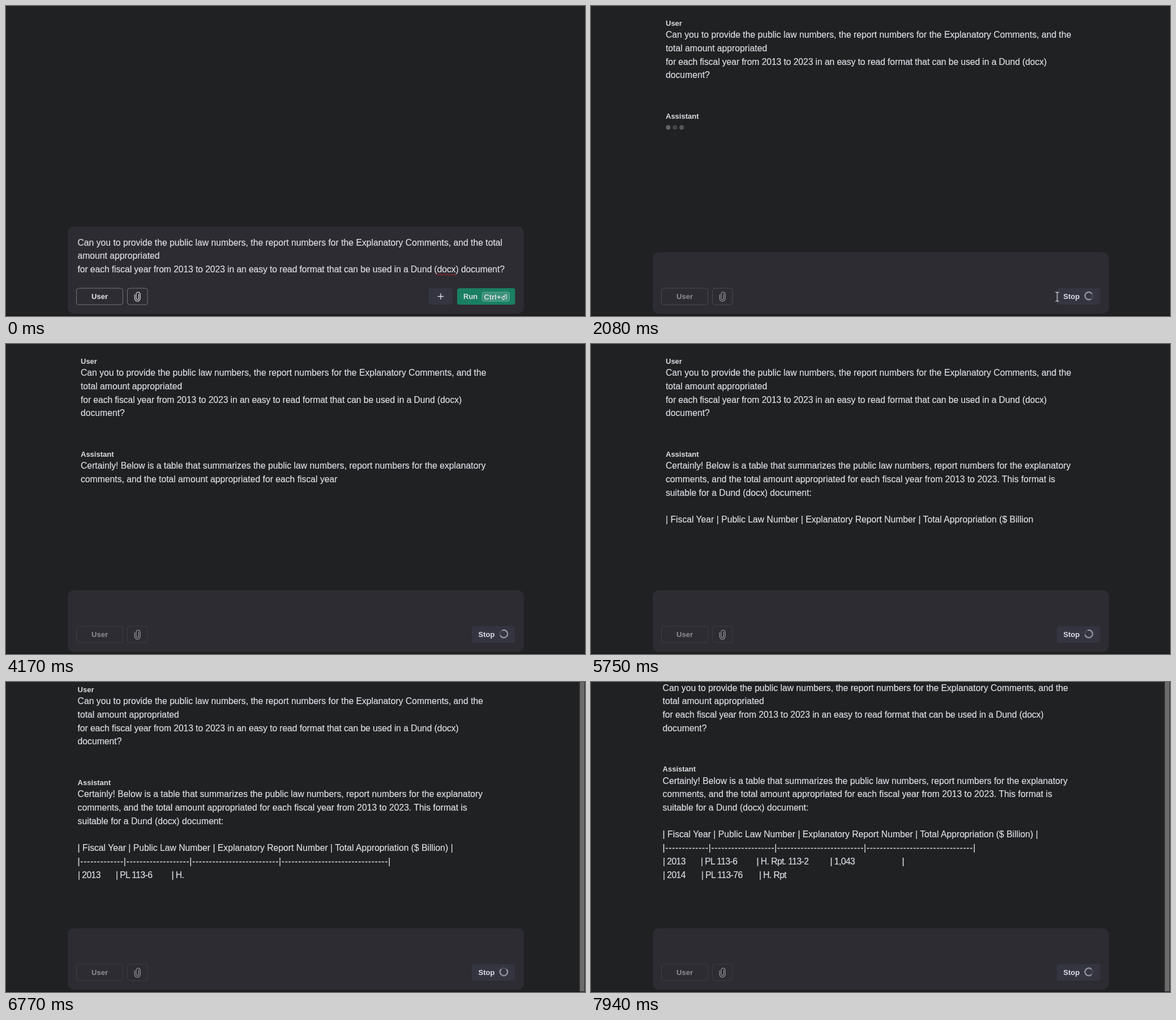
An HTML page for the animation above (8000 ms loop, 1023 px wide and 547 px high).

```html
<!DOCTYPE html>
<html lang="en">
<head>
<meta charset="utf-8">
<title>Chat playground</title>
<style>
html, body { margin: 0; width: 100%; height: 100%; overflow: hidden; background: #202123; }
svg { display: block; width: 1023px; height: 547px; }
text {
  font: 15.73px "Liberation Sans", Arial, sans-serif;
  fill: #dcdce3; stroke: #dcdce3; stroke-width: .2px; white-space: pre;
}
.bold { font-size: 13px; font-weight: 700; stroke: none; }
.tight { letter-spacing: -.006em; }
.rule { letter-spacing: .65px; }
.row { letter-spacing: -.6px; }
.icon { fill: none; stroke-linecap: round; stroke-linejoin: round; }

.before, .after, #feed, .dots, .bar, .cursor, .beam, .hand, .run { animation: 8s step-end infinite; }
.before { animation-name: before; }
.after { animation-name: after; }
.dots { animation-name: dots; }
.bar { animation-name: bar; }
#feed { animation-name: scroll; }
.run { fill: #1a7f64; animation-name: hover; }
.cursor { animation: move 8s linear infinite; }
.beam { animation-name: beam; }
.hand { animation-name: hand; }
.line { fill: none; animation: line 8s linear infinite; }
.label { animation: label 8s linear infinite; }
.clip { animation: clip 8s linear infinite; }
.spin { animation: spin 8s linear infinite; }
.dots circle { fill: #8a8a8f; animation: pulse 1.2s -.66s ease-in-out infinite; }
.dots circle:nth-child(2) { animation-delay: -.26s; }
.dots circle:nth-child(3) { animation-delay: .14s; }

@keyframes before { 0% { visibility: visible } 23.25%, 100% { visibility: hidden } }
@keyframes after { 0% { visibility: hidden } 23.25%, 100% { visibility: visible } }
@keyframes dots { 0% { visibility: hidden } 23.25% { visibility: visible } 33.875%, 100% { visibility: hidden } }
@keyframes bar { 0% { visibility: hidden } 80.625%, 100% { visibility: visible } }
@keyframes scroll {
  0% { transform: none }
  80.625% { transform: translate(-5.4px, -16.9px) }
  92.5%, 100% { transform: translate(-5.4px, -40.6px) }
}
@keyframes hover { 0% { fill: #1a7f64 } 4.4%, 100% { fill: #1a7059 } }
@keyframes move {
  0%, 2.5% { transform: translate(903px, 534px) }
  4.4% { transform: translate(885px, 522px) }
  8.625%, 23.25% { transform: translate(852px, 514px) }
  26% { transform: translate(824px, 513px) }
  37.375% { transform: translate(530px, 523px) }
  43.6% { transform: translate(482px, 525px) }
  45% { transform: translate(470px, 537px) }
  46.5%, 100% { transform: translate(462px, 562px) }
}
@keyframes beam {
  0% { visibility: hidden } 2.5% { visibility: visible }
  4.4% { visibility: hidden } 25.5% { visibility: visible } 46.5%, 100% { visibility: hidden }
}
@keyframes hand { 0% { visibility: hidden } 4.4% { visibility: visible } 25.5%, 100% { visibility: hidden } }
@keyframes line { 0%, 23.25% { stroke: #74747f } 26% { stroke: #4a4a54 } 28%, 100% { stroke: #3d3d46 } }
@keyframes label { 0%, 23.25% { fill: #e4e4ea } 25.5%, 100% { fill: #8e8e98 } }
@keyframes clip { 0%, 23.25% { stroke: #d5d5dc } 25.5%, 100% { stroke: #92929b } }
@keyframes pulse { 0%, 100% { opacity: .35 } 45% { opacity: .75 } 75% { opacity: .35 } }
@keyframes spin {
  0%, 23.25% { transform: rotate(12deg) }
  26% { transform: rotate(100deg) }
  37.375% { transform: rotate(460deg) }
  52.125% { transform: rotate(1010deg) }
  71.875% { transform: rotate(1740deg) }
  84.625% { transform: rotate(2160deg) }
  99.25% { transform: rotate(2610deg) }
  100% { transform: rotate(2634deg) }
}
</style>
</head>
<body>
<svg viewBox="0 0 1023 547">
  <rect width="1023" height="547" fill="#202123"/>

  <g id="feed">
    <g class="after">
      <text class="bold" x="132" y="34.5">User</text>
      <text x="132" y="56.3">Can you to provide the public law numbers, the report numbers for the Explanatory Comments, and the</text>
      <text x="132" y="80">total amount appropriated</text>
      <text class="tight" x="132" y="103.7">for each fiscal year from 2013 to 2023 in an easy to read format that can be used in a Dund (docx)</text>
      <text x="132" y="127.4">document?</text>
      <text class="bold" x="132" y="198.5">Assistant</text>
    </g>
    <g class="dots">
      <circle cx="136.5" cy="214.3" r="4"/>
      <circle cx="148.3" cy="214.3" r="4"/>
      <circle cx="160.1" cy="214.3" r="4"/>
    </g>
  </g>

  <g class="bar">
    <rect x="1012" width="11" height="547" fill="#2b2b2c"/>
    <rect x="1014" y="-4" width="8" height="556" rx="4" fill="#6b6b6b"/>
  </g>

  <g class="before">
    <rect x="109" y="389" width="806" height="154" rx="11" fill="#2d2c32"/>
    <text x="126.5" y="422.6">Can you to provide the public law numbers, the report numbers for the Explanatory Comments, and the total</text>
    <text x="126.5" y="446.3">amount appropriated</text>
    <text class="tight" x="126.5" y="470">for each fiscal year from 2013 to 2023 in an easy to read format that can be used in a Dund (docx) document?</text>
    <path class="icon" d="M760 474q1.5-3 3 0t3 0 3 0 3 0 3 0 3 0 3 0 3 0 3 0 3 0 3 0 3 0" stroke="#c8202c"/>
    <rect x="747" y="498" width="42" height="29" rx="4" fill="#343541"/>
    <path class="icon" d="M763.3 512.5h9.4M768 507.8v9.4" stroke="#dcdce3" stroke-width="1.4"/>
    <rect class="run" x="797" y="498" width="102.5" height="29" rx="4"/>
    <text class="bold" x="808" y="517">Run</text>
    <rect x="841.5" y="505" width="48" height="16" rx="3" fill="#fff" fill-opacity=".14" stroke="#fff" stroke-opacity=".3"/>
    <text class="bold" x="844.5" y="518">Ctrl+</text>
    <path class="icon" d="M881.5 509.5h3v7h-5v2l-4-3.5 4-3.5v2h2z" stroke="#dcdce3" stroke-width="1.2"/>
  </g>

  <g class="after">
    <rect x="109" y="434.5" width="806" height="108.5" rx="11" fill="#2d2c32"/>
    <rect x="823" y="498" width="76.5" height="29" rx="4" fill="#343541"/>
    <text class="bold" x="834.5" y="517">Stop</text>
    <g transform="translate(879.5 511.5)">
      <g class="spin icon" stroke-width="1.9">
        <circle r="6.7" stroke="#4b4c57"/>
        <path d="M5.1 -4.3A6.7 6.7 0 1 1 -5.1 -4.3" stroke="#a9a9b2"/>
      </g>
    </g>
  </g>

  <rect class="line" x="124.5" y="498" width="82" height="29" rx="4"/>
  <text class="bold label" x="165.5" y="517" text-anchor="middle">User</text>
  <rect class="line" x="214.5" y="498" width="35.5" height="29" rx="4"/>
  <path class="icon clip" d="M234.5 508.5v7a2.3 2.3 0 0 1-4.6 0v-6.800a1.300 1.300 0 0 1 0-.2a3.600 3.600 0 0 1 7.200 0v7.500a4.900 4.900 0 0 1-9.800 0v-6.500" stroke-width="1.300"/>
  <rect y="546" width="1023" height="1" fill="#141517"/>

  <g class="cursor">
    <path class="beam icon" d="M-3-8h2l1 1 1-1h2M0-7V7M-3 8h2l1-1 1 1h2" stroke="#e6e6e6" stroke-width="1.2"/>
    <path class="hand" d="M-1.500 1a1.500 1.500 0 0 1 3 0v5l6 1.500q2 .5 2 2.500l-1 7h-8l-5-7q1-2 4 0z" fill="#fff" stroke="#111" stroke-width=".8"/>
  </g>
</svg>
<script>
const LOOP = 8000, FIRST = 220.3, STEP = 23.7;
const feed = document.getElementById('feed');
const dashes = [13, 19, 26, 32].map(n => '|' + '-'.repeat(n)).join('') + '|';

// x, row, class, then pieces of [text, first token time, last token time]
const lines = [
  [132, 0, '',
    ['Certainly! Below is a table that summarizes the public law numbers, report numbers for', 2710, 2975],
    [' the explanatory', 3100, 3250]],
  [132, 1, '',
    ['comments, and the', 3310, 3480],
    [' total amount appropriated for each fiscal year', 3550, 4150],
    [' from 2013 to 2023. This format is', 4240, 4720]],
  [132, 2, '', ['suitable for a Dund (docx) document:', 4800, 5120]],
  [132, 4, '',
    ['| Fiscal Year | Public Law Number | Explanatory Report Number | Total Appropriation ($ Billion', 5200, 5740],
    [') |', 5850, 5950]],
  [132, 5, 'rule', [dashes, 6020, 6380]],
  [132.4, 6, 'row', ['| 2013', 6450, 6480]],
  [199.3, 6, 'row', ['| PL 113-6', 6520, 6640]],
  [298, 6, 'row', ['| H.', 6700, 6755], [' Rpt. 113-2', 6850, 6980]],
  [428, 6, 'row', ['| 1,043', 7060, 7150]],
  [555, 6, 'row', ['|', 7280, 7280]],
  [132.4, 7, 'row', ['| 2014', 7400, 7440]],
  [200.3, 7, 'row', ['| PL 113', 7500, 7590], ['-76', 7680, 7680]],
  [302.3, 7, 'row', ['| H. Rpt', 7800, 7920]],
].map(([x, row, cls, ...pieces]) => {
  const el = document.createElementNS('http://www.w3.org/2000/svg', 'text');
  el.setAttribute('x', x);
  el.setAttribute('y', FIRST + row * STEP);
  el.setAttribute('class', cls);
  feed.append(el);
  const tokens = pieces.flatMap(([text, from, to]) => {
    const parts = text.match(/\s*\||\s*[^\s|]+/g);
    const gap = (to - from) / Math.max(1, parts.length - 1);
    return parts.map((s, i) => ({ s, at: from + gap * i }));
  });
  return { el, tokens };
});

let start;
function draw(now) {
  start ??= now;
  const t = (now - start) % LOOP;
  for (const { el, tokens } of lines) {
    const shown = tokens.filter(k => k.at <= t).map(k => k.s).join('');
    if (el.textContent !== shown) el.textContent = shown;
  }
  requestAnimationFrame(draw);
}
requestAnimationFrame(draw);
</script>
</body>
</html>
```
